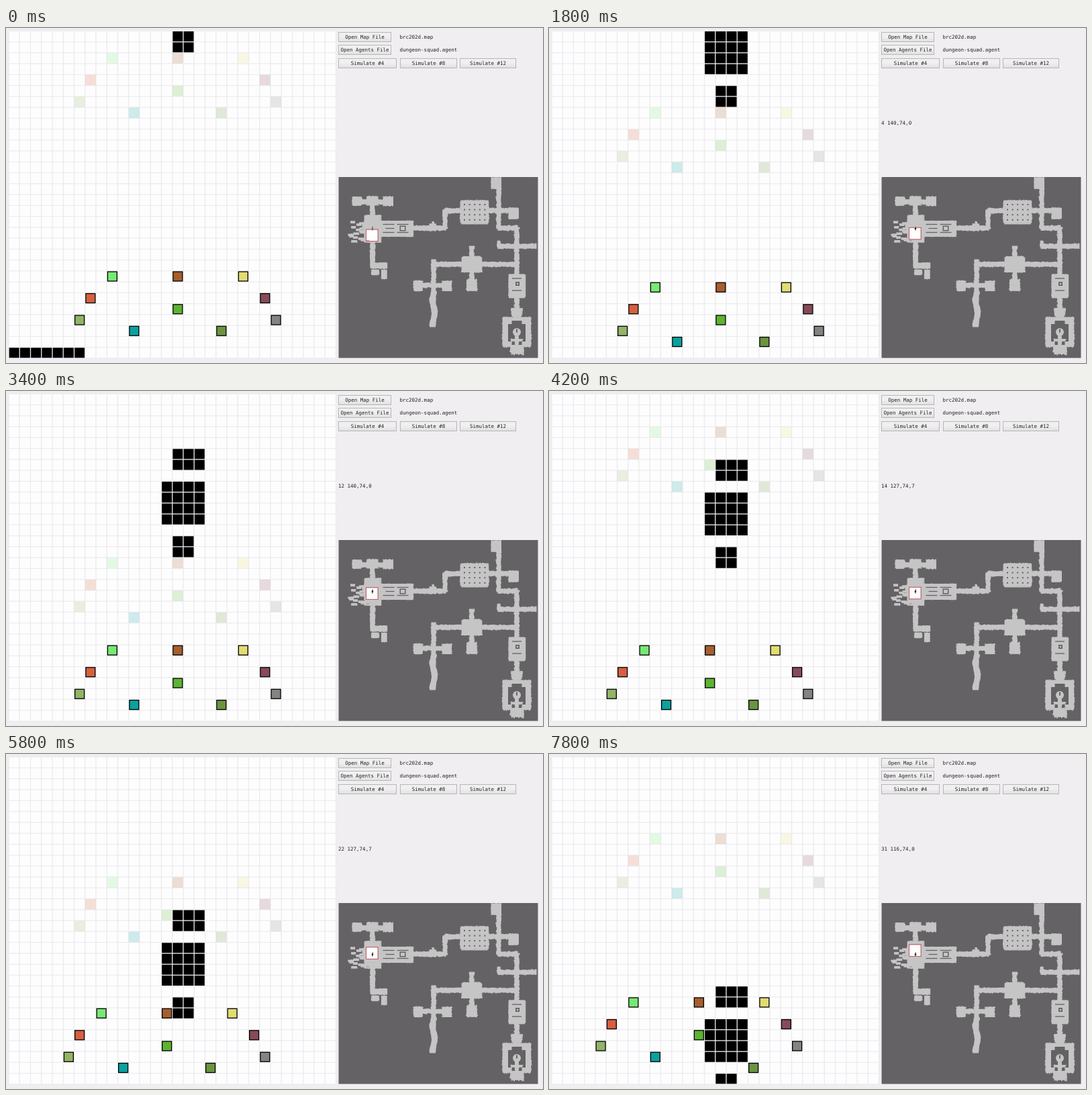
Write an HTML page with a canvas that moves like this. It is 800 by 499 pixels and loops after 8 s.

```html
<!DOCTYPE html>
<html lang="en">
<head>
<meta charset="utf-8">
<title>Squad path finding</title>
<style>
html, body { margin: 0; width: 100%; height: 100%; overflow: hidden; background: #f0eef0; }
#stage { position: relative; width: 800px; height: 499px; overflow: hidden;
  font: 7.5px/14px "DejaVu Sans Mono", monospace; color: #222; }
canvas { position: absolute; left: 0; top: 0; }
.btn, .label { position: absolute; white-space: pre; height: 14px; }
.btn { box-sizing: border-box; height: 15px; line-height: 13px; text-align: center;
  border: 1px solid #b8b6b8; background: linear-gradient(#f1f0f1 45%, #e2e1e2); }
</style>
</head>
<body>
<div id="stage">
  <canvas id="view" width="800" height="499"></canvas>
  <div class="btn" style="left:495px;top:6px;width:79px">Open Map File</div>
  <div class="btn" style="left:495px;top:25px;width:79px">Open Agents File</div>
  <div class="btn" style="left:495px;top:45px;width:87px">Simulate #4</div>
  <div class="btn" style="left:587px;top:45px;width:85px">Simulate #8</div>
  <div class="btn" style="left:676px;top:45px;width:84px">Simulate #12</div>
  <div class="label" style="left:586.5px;top:7px">brc202d.map</div>
  <div class="label" style="left:586.5px;top:26px">dungeon-squad.agent</div>
  <div class="label" id="status" style="left:495px;top:135px"></div>
</div>
<script>
const ctx = document.getElementById('view').getContext('2d');
const statusLabel = document.getElementById('status');

const LEFT = 4, TOP = 4.4, CELLS = 30, PITCH = 16.25, SIZE = CELLS * PITCH;
const TICK = 200, TICKS = 40, GOAL_AHEAD = 20;
const WHITE = '#fefdfe', DARK = '#646264', LIGHT = '#c6c5c6';

// minimap: scale per cell, and the cell at the board's first top left corner
const MAP = { x: 495.5, y: 222, w: 297, h: 269.5, scale: 297 / 530, col: 74, row: 140 };

// the squad is symmetric about its middle column
const MIDDLE = 15;
const agent = (col, row, color, role) => ({ col, row, color, role });
const pair = (d, row, left, right, role) =>
  [agent(MIDDLE - d, row, left), agent(MIDDLE + d, row, right, role)];
const squad = [
  agent(MIDDLE, 22, '#a65f2d'),
  agent(MIDDLE, 25, '#5cb431', 'centre'),
  ...pair(6, 22, '#78e874', '#e2dc72'),
  ...pair(8, 24, '#d5603f', '#884a58'),
  ...pair(9, 26, '#92b465', '#848480'),
  ...pair(4, 27, '#0aa29e', '#6b9440', 'detour')
];

const wall = (col, row, w, h) => ({ col, row, w, h });
const walls = [wall(15, -8, 3, 2), wall(14, -5, 4, 4), wall(15, 0, 2, 2), wall(0, 29, 7, 1)];

// rows climbed when each plan starts, and the last number in its status
const plans = [
  { from: 0, climbed: 0, extra: 0 },
  { from: 20, climbed: 13, extra: 7 },
  { from: 33, climbed: 24, extra: 0 }
];

function stateAt(tick) {
  // one step per tick, apart from pauses for planning
  const pauses = [18, 20, 33].filter(t => tick >= t).length;
  const count = Math.max(0, tick - 5 - pauses);
  const shift = (count >= 14) + (count >= 26);
  const climbed = count - shift;
  const settled = tick < 5 || [13, 25, 31].includes(count);
  return {
    count, shift, climbed,
    scroll: climbed + (settled ? 0 : 1),
    plan: plans.filter(p => tick >= p.from).pop(),
    detour: count >= 31 ? 1 : 0,
    started: tick >= 5
  };
}

function makeMap() {
  const layer = document.createElement('canvas');
  layer.width = 800;
  layer.height = 499;
  const g = layer.getContext('2d');
  let seed = 17;
  const rnd = () => (seed = seed * 16807 % 2147483647) / 2147483647;

  // box around a centre
  function box(color, x, y, w, h) {
    g.fillStyle = color;
    g.fillRect(x - w / 2, y - h / 2, w, h);
  }

  // ragged corridor through a few points
  function hall(...pts) {
    for (let i = 1; i < pts.length; i++) {
      const [ax, ay] = pts[i - 1], [bx, by] = pts[i];
      const n = Math.ceil(Math.hypot(bx - ax, by - ay) / 2);
      for (let k = 0; k <= n; k++) {
        const x = ax + (bx - ax) * k / n, y = ay + (by - ay) * k / n;
        const across = 6 + rnd() * 2.4, j = rnd() - .5;
        if (ax === bx) box(LIGHT, x + j, y, across, 3);
        else box(LIGHT, x, y + j, 3, across);
      }
    }
  }

  // room whose rim is broken into small steps
  function room(x, y, w, h, rim = 2) {
    box(LIGHT, x, y, w - rim, h - rim);
    for (let d = -w / 2 + 1; d < w / 2; d += 1.7) box(LIGHT, x + d, y, 1.8, h - rim + rnd() * rim * 1.5);
    for (let d = -h / 2 + 1; d < h / 2; d += 1.7) box(LIGHT, x, y + d, w - rim + rnd() * rim * 1.5, 1.8);
  }

  g.fillStyle = DARK;
  g.fillRect(MAP.x, MAP.y, MAP.w, MAP.h);

  hall([734, 238], [734, 298], [761, 298], [761, 425]);
  hall([604, 298], [654, 298], [654, 272], [750, 272]);
  hall([637, 346], [637, 352], [758, 352]);
  hall([637, 352], [637, 395]);
  hall([546, 262], [546, 352]);
  hall([734, 325], [789, 325]);
  hall([610, 383], [662, 383]);
  hall([694, 326], [694, 378]);
  hall([520, 259], [572, 259]);
  for (let y = 394; y < 445; y += 2) box(LIGHT, 637 + 1.5 * Math.sin(y / 6), y, 8 + rnd() * 2, 3);

  room(730, 231, 15, 17);
  room(756, 276, 15, 17);
  room(636, 297, 11, 11);
  room(636, 292, 3, 8);
  room(734, 322, 5, 11);
  room(694, 352, 31, 24, 4);
  room(694, 383, 16, 17, 4);
  room(761, 384, 25, 35);
  for (const side of [-1, 1]) {
    room(546 + side * 23, 258, 15, 14, 4);
    room(635.5 + side * 21.5, 384, 14, 15, 4);
  }
  room(546, 257, 18, 13, 4);
  room(555, 354, 25, 9);
  room(550, 364, 12, 9, 4);
  room(563, 367, 8, 14);

  // western hall with its broken side
  room(546, 299, 25, 41, 3);
  room(582, 299, 50, 24);
  for (let i = 0; i < 16; i++) room(513 + rnd() * 22, 289 + i * 1.9, 6 + rnd() * 5, 3, 1);
  for (const side of [-1, 1]) {
    for (const x of [570, 591]) box(DARK, x, 298.5 + side * 6, 17, 1.3);
  }
  box(DARK, 572, 298.5, 13, 1.3);
  box(DARK, 591, 298.5, 9, 8);
  box(LIGHT, 591, 298.5, 6, 5);

  // pillared hall
  room(698, 274, 43, 35, 4);
  for (let i = 0; i < 5; i++)
    for (let j = 0; j < 4; j++) box(DARK, 683 + i * 7.6, 263 + j * 7.6, 2, 2);

  // shrine
  for (const side of [-1, 1]) box(DARK, 761, 382 + side * 9, 14, 1.3);
  box(DARK, 762, 381, 6, 6);
  box(LIGHT, 762, 381, 2.5, 2.5);

  // great hall: light outside, dark ring, dais with a stair
  room(761, 424, 16, 14, 5);
  room(761, 453, 43, 45, 4);
  room(761, 479, 20, 14, 6);
  box(DARK, 761, 454, 26, 26);
  box(DARK, 761, 454, 15, 36);
  g.fillStyle = LIGHT;
  g.beginPath();
  g.arc(761, 453, 6, 0, 7);
  g.fill();
  room(761, 466, 6, 17);
  room(761, 465, 18, 4);
  box(DARK, 761, 451, 2, 5);
  return layer;
}

const map = makeMap();

function drawWallsOnMap(color, x, y) {
  const s = MAP.scale;
  ctx.fillStyle = color;
  for (const { col, row, w, h } of walls) ctx.fillRect(x + col * s, y + row * s, w * s, h * s);
}

function drawMap(scroll) {
  const x = MAP.x + MAP.col * MAP.scale, home = MAP.y + MAP.row * MAP.scale;
  const y = home - scroll * MAP.scale, size = CELLS * MAP.scale;
  ctx.drawImage(map, 0, 0);
  drawWallsOnMap(DARK, x, home);
  ctx.save();
  ctx.beginPath();
  ctx.rect(x, y, size, size);
  ctx.clip();
  ctx.fillStyle = WHITE;
  ctx.fillRect(x, y, size, size);
  drawWallsOnMap('#000', x, home);
  ctx.restore();
  ctx.strokeStyle = '#c04a52';
  ctx.lineWidth = .9;
  ctx.strokeRect(x - .4, y - .4, size + .8, size + .8);
}

function drawGrid() {
  ctx.strokeStyle = '#ececef';
  ctx.lineWidth = 1.4;
  ctx.beginPath();
  for (let i = 0; i <= CELLS; i++) {
    const p = i * PITCH;
    ctx.moveTo(LEFT + p, TOP);
    ctx.lineTo(LEFT + p, TOP + SIZE);
    ctx.moveTo(LEFT, TOP + p);
    ctx.lineTo(LEFT + SIZE, TOP + p);
  }
  ctx.stroke();
}

function fillCell(color, col, row, inset) {
  const s = PITCH - inset * 2;
  ctx.fillStyle = color;
  ctx.fillRect(LEFT + col * PITCH + inset, TOP + row * PITCH + inset, s, s);
}

function drawBoard(st) {
  ctx.fillStyle = WHITE;
  ctx.fillRect(LEFT, TOP, SIZE, SIZE);
  drawGrid();
  ctx.save();
  ctx.beginPath();
  ctx.rect(LEFT, TOP, SIZE, SIZE);
  ctx.clip();

  // goals; the centre one gives way to a wall in the second plan
  ctx.globalAlpha = .2;
  for (const { col, row, color, role } of squad) {
    const aside = role === 'centre' && st.plan === plans[1] ? 1 : 0;
    fillCell(color, col - aside, row - GOAL_AHEAD - st.plan.climbed + st.scroll, .4);
  }
  ctx.globalAlpha = 1;

  for (const { col, row, w, h } of walls)
    for (let i = 0; i < w; i++)
      for (let j = 0; j < h; j++) fillCell('#000', col + i, row + j + st.scroll, .65);

  for (const { col, row, color, role } of squad) {
    const side = role === 'detour' ? st.detour : 0;
    const c = col - st.shift + side, r = row + st.scroll - st.climbed + side;
    fillCell('#000', c, r, .5);
    fillCell(color, c, r, 1.8);
  }
  ctx.restore();
}

function frame(now) {
  const st = stateAt(Math.floor(now / TICK) % TICKS);
  ctx.clearRect(0, 0, 800, 499);
  drawBoard(st);
  drawMap(st.scroll);
  const { climbed, extra } = st.plan;
  const text = st.started ? `${st.count} ${MAP.row - climbed},${MAP.col},${extra}` : '';
  if (statusLabel.textContent !== text) statusLabel.textContent = text;
}

const start = performance.now();
function loop() {
  frame(performance.now() - start);
  requestAnimationFrame(loop);
}
loop();
</script>
</body>
</html>
```
